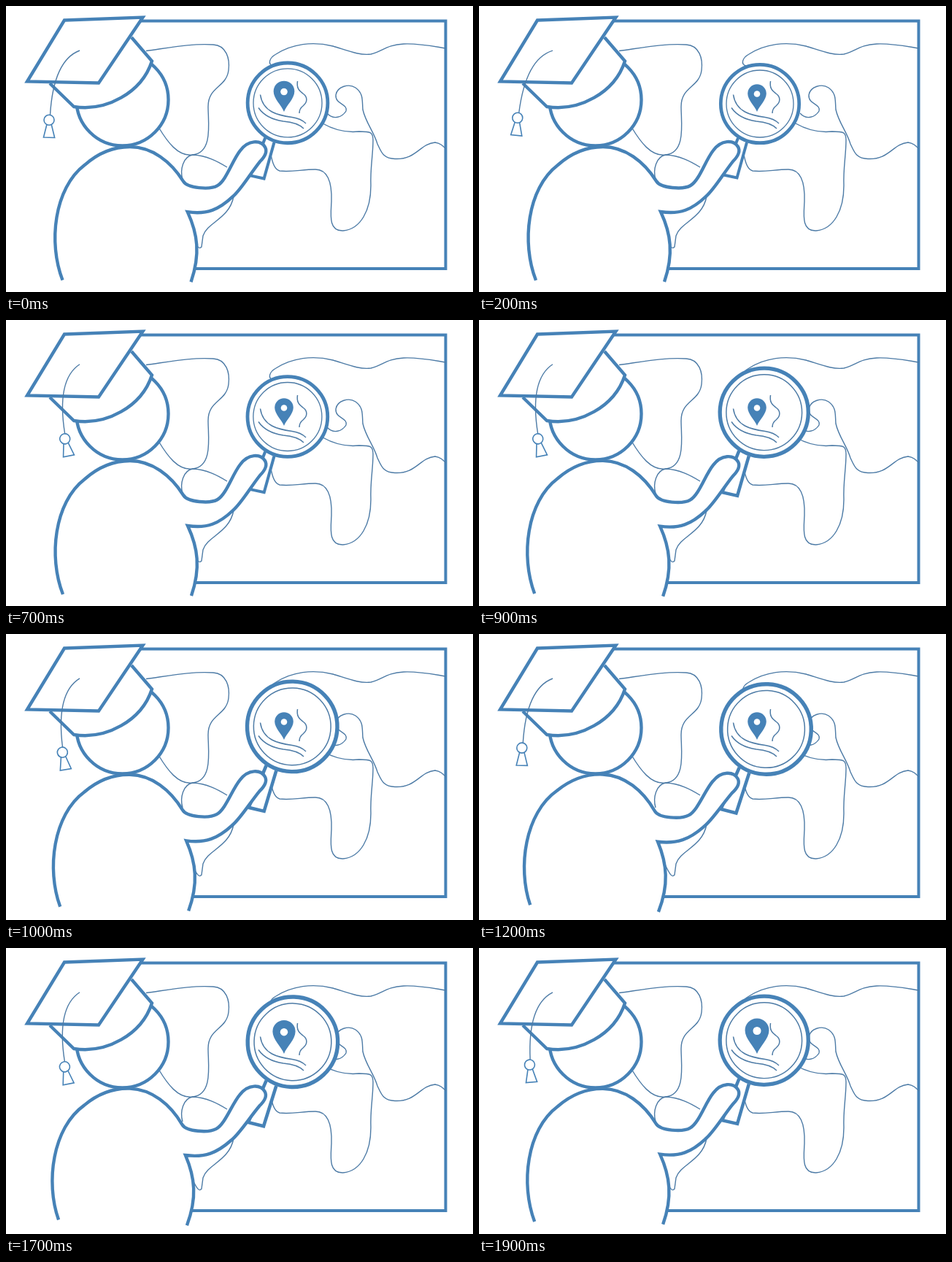
These frames come from a looping animation (640 by 392 pixels, 2 s). An HTML page with a canvas:

```html
<!DOCTYPE html>
<html lang="en">
<head>
<meta charset="utf-8">
<title>Student exploring a map</title>
<style>
  html, body { margin: 0; width: 100%; height: 100%; overflow: hidden; background: #fff; }
  canvas { display: block; width: 640px; height: 392px; }
</style>
</head>
<body>
<canvas id="stage"></canvas>
<script>
const W = 640, H = 392, LOOP = 2000, STEP = 100;
const BLUE = '#4682b7', THIN = '#4d7ba6';
const canvas = document.getElementById('stage');
const ctx = canvas.getContext('2d');
const ratio = window.devicePixelRatio || 1;
canvas.width = W * ratio;
canvas.height = H * ratio;

// Tracks are [time, value] keys, joined by cosine easing
const SWING = [[150, .496], [500, .195], [900, .195], [1380, .516], [1720, .195], [2150, .496]];
const LEAN = [[100, 0], [700, 0], [1400, 1], [2100, 0]];
const ZOOM = [[50, 0], [600, 0], [1000, 1], [1850, 1], [2050, 0]];
const PULSE = [[120, 1], [1500, 1], [1830, 1.33], [2120, 1]];

function track(keys, t) {
  if (t < keys[0][0]) t += LOOP;
  const i = keys.findIndex(k => k[0] > t);
  if (i < 1) return keys[keys.length - 1][1];
  const [t0, a] = keys[i - 1], [t1, b] = keys[i];
  return a + (b - a) * (1 - Math.cos(Math.PI * (t - t0) / (t1 - t0))) / 2;
}

const MAP = [
  // north-west
  'M192 61.5C225 57 255 51 284 53C302 54 307 72 305 88C302 112 277 110 277 138C277 160 284 201 256 204C236 207 221 186 209 166',
  'M242 238C238 224 243 206 256 204C275 205 290 213 303 221',
  'M312 261C306 292 276 296 270 315L268 330C265 334 262 331 255 316',
  // north-east
  'M366 82C358 80 361 71 370 66C392 52 420 48 448 55C468 61 484 68 500 66C516 62 522 53 545 52C565 51 584 55 603 58',
  'M440 147C449 157 461 152 466 144C469 134 451 135 452 122C454 110 470 106 479 112C490 120 488 129 489 142C493 160 504 172 509 189C514 199 516 209 533 209.5C562 211 567 189 588 187C595 188 598 191 603 196',
  // south
  'M434 161C450 170 466 174 484 172C500 172 503 173 503 184C503 205 499 222 500 246C500 280 486 306 462 308C442 309 445 287 446 268C447 240 440 224 424 224C405 224 392 228 375 226C367 224 364 212 361 192'
].map(d => new Path2D(d));

const ROADS = new Path2D(
  'M348.500 121.500C352 146 374 150 392 152.500C402 154 407 157 411 161' +
  'M346 139.500C354 151 366 156 380 158C392 159 402 162 408 168' +
  'M399.500 103C398 113 402 116 407 120C414 125 413 132 407 137C403 140 402 143 402 147');

const CAP_BAND = new Path2D('M60 106L93 138C137 145 186 119 200 75.500L172 43');
const CAP_TOP = new Path2D('M80 19.500L187.500 15.500L127 105.500L29 103.500Z');
const CORD = new Path2D('M101 61C74 71 63 104 60 149');
const TASSEL = new Path2D('M55.500 161.500L50.800 179.800L66 180.300L61.500 161.500');

// Start point, then cubic segments
const BODY = [
  [78, 376],
  [58, 325], [66, 250], [108, 218],
  [126, 202], [148, 193], [170, 193],
  [200, 193], [226, 213], [243, 240],
  [249, 250], [280, 252], [290, 246],
  [302, 239], [310, 212], [321, 198],
  [332, 183], [349, 183], [355, 193],
  [359, 200], [354, 207], [348, 213],
  [336, 228], [322, 252], [311, 261],
  [292, 279], [276, 286], [249, 282],
  [263, 312], [267, 340], [254, 378]
];

function ink(path, width, color = BLUE, fill) {
  if (fill) {
    ctx.fillStyle = fill;
    ctx.fill(path);
  }
  ctx.lineWidth = width;
  ctx.strokeStyle = color;
  ctx.stroke(path);
}

function disc(x, y, r, from = 0, to = Math.PI * 2) {
  const p = new Path2D();
  p.arc(x, y, r, from, to);
  return p;
}

// The body tilts around the neck; the arm is held a little higher
function leaned(x, y, angle, lift) {
  const dx = x - 183, dy = y - 188;
  const c = Math.cos(angle), s = Math.sin(angle);
  return [183 + dx * c - dy * s, 188 + dx * s + dy * c - lift];
}

function drawBoard() {
  ink(new Path2D('M150 20.500H602.500V360H180'), 4);
  MAP.forEach(p => ink(p, 1.4, THIN));
}

function drawHead(t) {
  ink(disc(159.5, 128.5, 63), 4.4, BLUE, '#fff');
  ink(CAP_BAND, 4.4, BLUE, '#fff');
  ink(CAP_TOP, 4.4, BLUE, '#fff');
  ctx.save();
  ctx.translate(100, 61);
  ctx.rotate(track(SWING, t) - .42);
  ctx.translate(-100, -61);
  ink(CORD, 1.4, THIN);
  ink(TASSEL, 1.6, BLUE, '#fff');
  ink(disc(58.5, 156, 7), 1.6, BLUE, '#fff');
  ctx.restore();
}

function drawLens(t, angle, lift) {
  const zoom = 1 + .15 * track(ZOOM, t);
  ctx.save();
  ctx.translate(...leaned(345, 203, angle, lift));
  ctx.rotate(angle);
  ctx.scale(zoom, zoom);
  ink(new Path2D('M10 -22L-10 28.500L8.500 32.500L22 -16'), 4, BLUE, '#fff');
  ink(disc(40, -69, 53.7), 4.7, BLUE, '#fff');
  ink(disc(40, -69, 46), 1.3, THIN);
  ctx.restore();
  ink(ROADS, 1.5, THIN);
}

function drawPin(t) {
  const size = track(PULSE, t);
  ctx.save();
  ctx.translate(381, 145);
  ctx.scale(size, size);
  ctx.fillStyle = BLUE;
  ctx.fill(new Path2D('M0 0C-3 -8 -12.800 -16 -12.800 -25A12.800 12.800 0 0 1 12.800 -25C12.800 -16 3 -8 0 0Z'));
  ctx.fillStyle = '#fff';
  ctx.fill(disc(0, -24.5, 4.3));
  ctx.restore();
}

function drawBody(angle, lift) {
  const pts = BODY.map(([x, y]) => leaned(x, y, angle, x > 264 && y < 300 ? lift : 0));
  const p = new Path2D();
  p.moveTo(...pts[0]);
  for (let i = 1; i < pts.length; i += 3) {
    p.bezierCurveTo(...pts[i], ...pts[i + 1], ...pts[i + 2]);
  }
  ink(p, 4.4, BLUE, '#fff');
}

function draw(t) {
  const lean = track(LEAN, t);
  const angle = .052 * lean, lift = 2.5 * lean;
  ctx.setTransform(ratio, 0, 0, ratio, 0, 0);
  ctx.fillStyle = '#fff';
  ctx.fillRect(0, 0, W, H);
  drawBoard();
  drawHead(t);
  drawLens(t, angle, lift);
  drawPin(t);
  drawBody(angle, lift);
}

const start = performance.now();
function tick() {
  const t = (performance.now() - start) % LOOP;
  draw(Math.floor(t / STEP) * STEP);
  requestAnimationFrame(tick);
}
tick();
</script>
</body>
</html>
```
